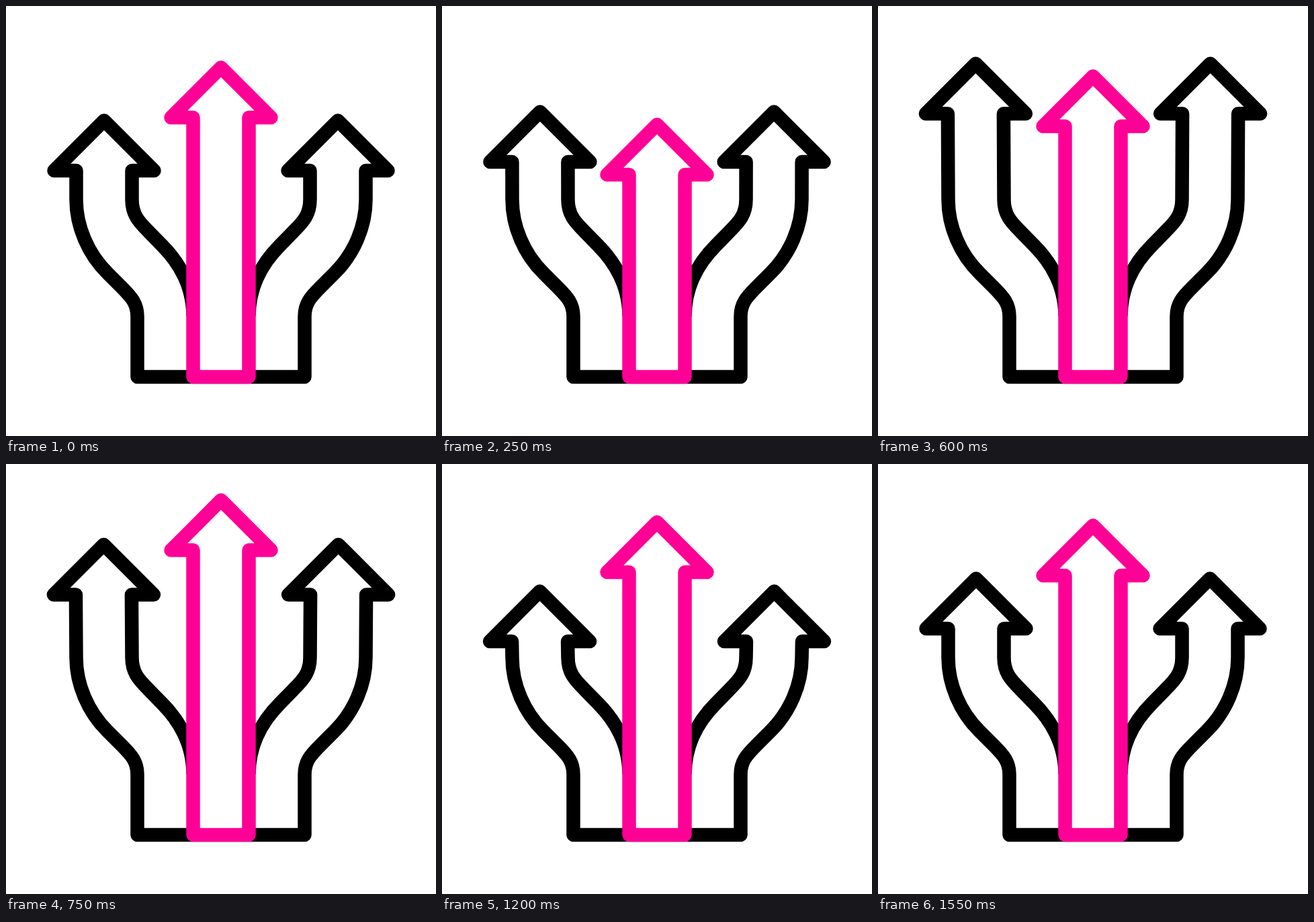
Write an HTML page that moves like this. It is 640 px wide and 640 px high and loops after 1600 ms.

```html
<!DOCTYPE html>
<html>
<head>
<meta charset="utf-8">
<style>
  html, body { margin: 0; height: 100%; overflow: hidden; background: #fff; }
  svg { display: block; width: 100vw; height: 100vh; }
</style>
</head>
<body>
<svg viewBox="0 0 640 640" fill="none" stroke="#000" stroke-width="20.5" stroke-linejoin="round">
  <path id="left"/>
  <path id="right" transform="matrix(-1 0 0 1 640 0)"/>
  <path id="middle" stroke="#ff0096" fill="#fff"/>
</svg>
<script>
const LOOP = 1600, STEP = 50;
const [left, right, middle] = ['left', 'right', 'middle'].map(id => document.getElementById(id));

// Keys are [time, value] pairs, eased in and out between neighbours.
const middleY = [[0, 0], [317, 96], [825, -46], [1295, 0]];
const sideY = [[170, 0], [495, -85], [591, -85], [1021, 26.3], [1540, 0]];
const sideX = [[170, 0], [495, -0.6], [1021, -0.6], [1540, 0]];

function valueAt(keys, t) {
  const next = keys.findIndex(([time]) => time > t);
  if (next < 0) return keys[keys.length - 1][1];
  if (next === 0) return keys[0][1];
  const [t0, a] = keys[next - 1], [t1, b] = keys[next];
  const u = (t - t0) / (t1 - t0);
  return a + (b - a) * u * u * (3 - 2 * u);
}

// Arrow head from the left stem to the right stem, with its shoulders at y.
const head = (x, y) =>
  `L${x - 41.5} ${y}H${x - 74.5}L${x} ${y - 74.5}L${x + 74.5} ${y}H${x + 41.5}`;

function draw(t) {
  const side = 'M320 552H195.5V462C195.5 443 187 433.5 172 418.5L151 397.5C122 369 104.5 328 104.5 288' +
    head(146 + valueAt(sideX, t), 245 + valueAt(sideY, t)) +
    'L187.5 288C187.5 310 197 320.5 212 335.5L232 356C262 386 278.5 422 278.5 462';
  left.setAttribute('d', side);
  right.setAttribute('d', side);
  middle.setAttribute('d', 'M278.5 552' + head(320, 166 + valueAt(middleY, t)) + 'V552Z');
}

function tick() {
  draw(Math.floor(performance.now() % LOOP / STEP) * STEP);
  requestAnimationFrame(tick);
}
tick();
</script>
</body>
</html>
```
